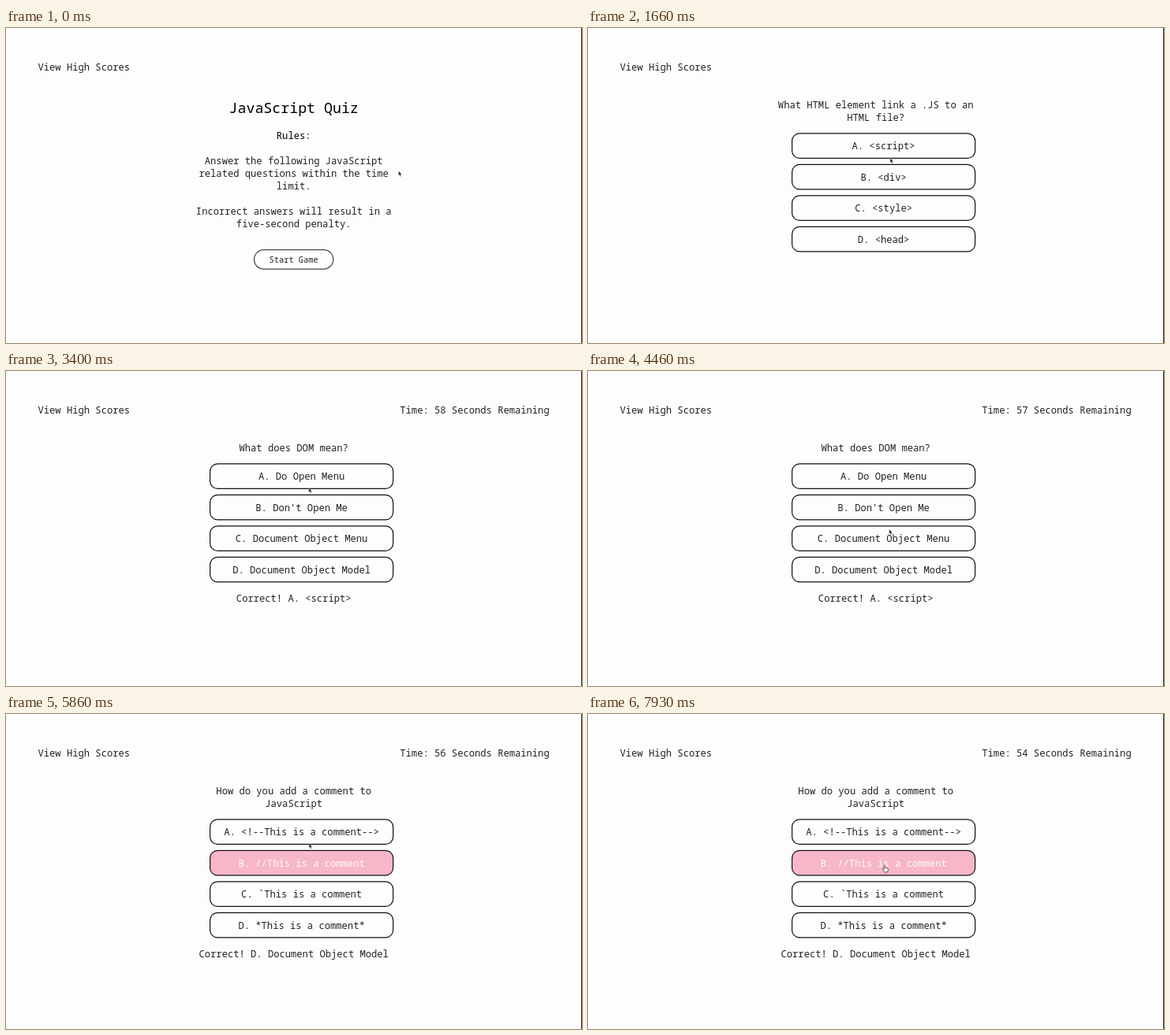
Write an HTML page that moves like this. It is 730x400 px and loops after 8 s.

```html
<!DOCTYPE html>
<html lang="en">
<head>
<meta charset="utf-8">
<title>JavaScript Quiz</title>
<style>
  html, body { margin: 0; width: 100%; height: 100%; overflow: hidden; background: #fdfdfd; }
  svg { display: block; }
  text { font: 300 12.15px "Roboto Mono", "Noto Sans Mono", monospace; fill: #222; text-anchor: middle; }
  .left { text-anchor: start; }
  .title { font-size: 18.25px; fill: #000; }
  .rules { fill: #000; }
  .start text { font-size: 10.35px; }
  rect { fill: #fdfdfd; stroke: #111; stroke-width: 1.2px; }
  .start rect { stroke: #444; }
  .hover rect { fill: #f8b6c9; }
  .hover text { fill: #fdfdfd; }
</style>
</head>
<body>
<svg width="730" height="400" viewBox="0 0 730 400">
  <path d="M729.5 0V400" stroke="#222"/>
  <text class="left" x="40.5" y="53.6">View High Scores</text>
  <text id="timer" class="left" x="499.3" y="53.6"></text>
  <g id="screens"></g>
  <g id="cursor">
    <path id="arrow" d="M0 0V6L1.3 4.8L2.3 7L3.3 6.5L2.4 4.5H4.1Z" fill="#222" stroke="#ddd" stroke-width=".4"/>
    <path id="hand" d="M0 .8Q.8 -.4 1.5 .8L2 3.3L4.9 4Q5.8 4.3 5.6 5.6L4.8 8.8H1.1L-1.5 5.3Q-1.3 4.3 -.2 4.9L.5 5.4Z"
      fill="#fff" stroke="#333" stroke-width=".8"/>
  </g>
</svg>
<script>
const LOOP = 8000, HOVER_LAG = 75, CENTER = 364.7, LINE = 16, ROW = 39.5;
const $ = id => document.getElementById(id);

function add(parent, tag, attrs, content = '') {
  const node = document.createElementNS('http://www.w3.org/2000/svg', tag);
  for (const key in attrs) node.setAttribute(key, attrs[key]);
  node.textContent = content;
  return parent.appendChild(node);
}

const label = (parent, content, y, cls = '', x = CENTER) =>
  add(parent, 'text', { x, y: y + 4.3, class: cls }, content);

const paragraph = (parent, lines, y) =>
  lines.forEach((line, i) => label(parent, line, y + LINE * i));

function button(parent, content, x, y, width, height, rx, cls = '') {
  const node = add(add(parent, 'g', { class: cls }), 'g', {});
  add(node, 'rect', { x, y, width, height, rx });
  label(node, content, y + height / 2 + .1, '', x + width / 2);
  return { node, contains: p => p.x > x && p.x < x + width && p.y > y && p.y < y + height };
}

function introScreen() {
  const node = add($('screens'), 'g', {});
  label(node, 'JavaScript Quiz', 103.8, 'title');
  label(node, 'Rules:', 137, 'rules');
  paragraph(node, ['Answer the following JavaScript', 'related questions within the time', 'limit.', '',
    'Incorrect answers will result in a', 'five-second penalty.'], 169);
  return { node, from: 0, buttons: [button(node, 'Start Game', 314.5, 281.6, 100.3, 24.5, 12.2, 'start')] };
}

function quizScreen(from, question, answers, feedback = '') {
  const node = add($('screens'), 'g', {});
  const top = 101.9 + LINE * question.length;
  paragraph(node, question, 97.8);
  const buttons = answers.map((answer, i) =>
    button(node, `${'ABCD'[i]}. ${answer}`, 258.6, top + ROW * i, 232, 31.5, 9.5));
  label(node, feedback, top + 171.1);
  return { node, from, buttons };
}

const screens = [
  introScreen(),
  quizScreen(940, ['What HTML element link a .JS to an', 'HTML file?'],
    ['<script>', '<div>', '<style>', '<head>']),
  quizScreen(2730, ['What does DOM mean?'],
    ['Do Open Menu', "Don't Open Me", 'Document Object Menu', 'Document Object Model'],
    'Correct! A. <script>'),
  quizScreen(5230, ['How do you add a comment to', 'JavaScript'],
    ['<!--This is a comment-->', '//This is a comment', '`This is a comment', '*This is a comment*'],
    'Correct! D. Document Object Model')
];

// Pointer moves: start, end, and the point reached.
const home = { x: 497.5, y: 181.5 };
const moves = [
  [60, 660, 371.5, 295.5],
  [1400, 1718, 384, 153],
  [3340, 3480, 383.5, 141],
  [4000, 4460, 381.7, 201],
  [4480, 4800, 381, 247.5],
  [5690, 5870, 384, 163.5],
  [6000, 6400, 379, 108],
  [7260, 7930, 374.8, 192]
];

const clamp = v => Math.min(1, Math.max(0, v));
const ease = k => k * k * (3 - 2 * k);

function pointer(t) {
  let { x, y } = home;
  for (const [start, end, toX, toY] of moves) {
    const k = ease(clamp((t - start) / (end - start)));
    x += (toX - x) * k;
    y += (toY - y) * k;
  }
  return { x, y };
}

const show = (node, visible) => node.setAttribute('display', visible ? 'inline' : 'none');

function draw(t) {
  const screen = screens.filter(s => s.from <= t).pop();
  const now = pointer(t), before = pointer(t - HOVER_LAG);
  // After a click the hand stays until the pointer moves again.
  const held = screen.from > 0 && !moves.some(([start]) => start > screen.from && start <= t);
  let isHand = held;
  screens.forEach(s => show(s.node, s === screen));
  for (const b of screen.buttons) {
    const hovered = !held && b.contains(before);
    b.node.setAttribute('class', hovered ? 'hover' : '');
    isHand ||= hovered && b.contains(now);
  }
  const elapsed = Math.floor((t - screens[1].from) / 1000);
  $('timer').textContent = elapsed > 0 ? `Time: ${60 - elapsed} Seconds Remaining` : '';
  $('cursor').setAttribute('transform', `translate(${now.x} ${now.y})`);
  show($('arrow'), !isHand);
  show($('hand'), isHand);
}

const begin = performance.now();
function frame() {
  draw((performance.now() - begin) % LOOP);
  requestAnimationFrame(frame);
}
frame();
</script>
</body>
</html>
```
